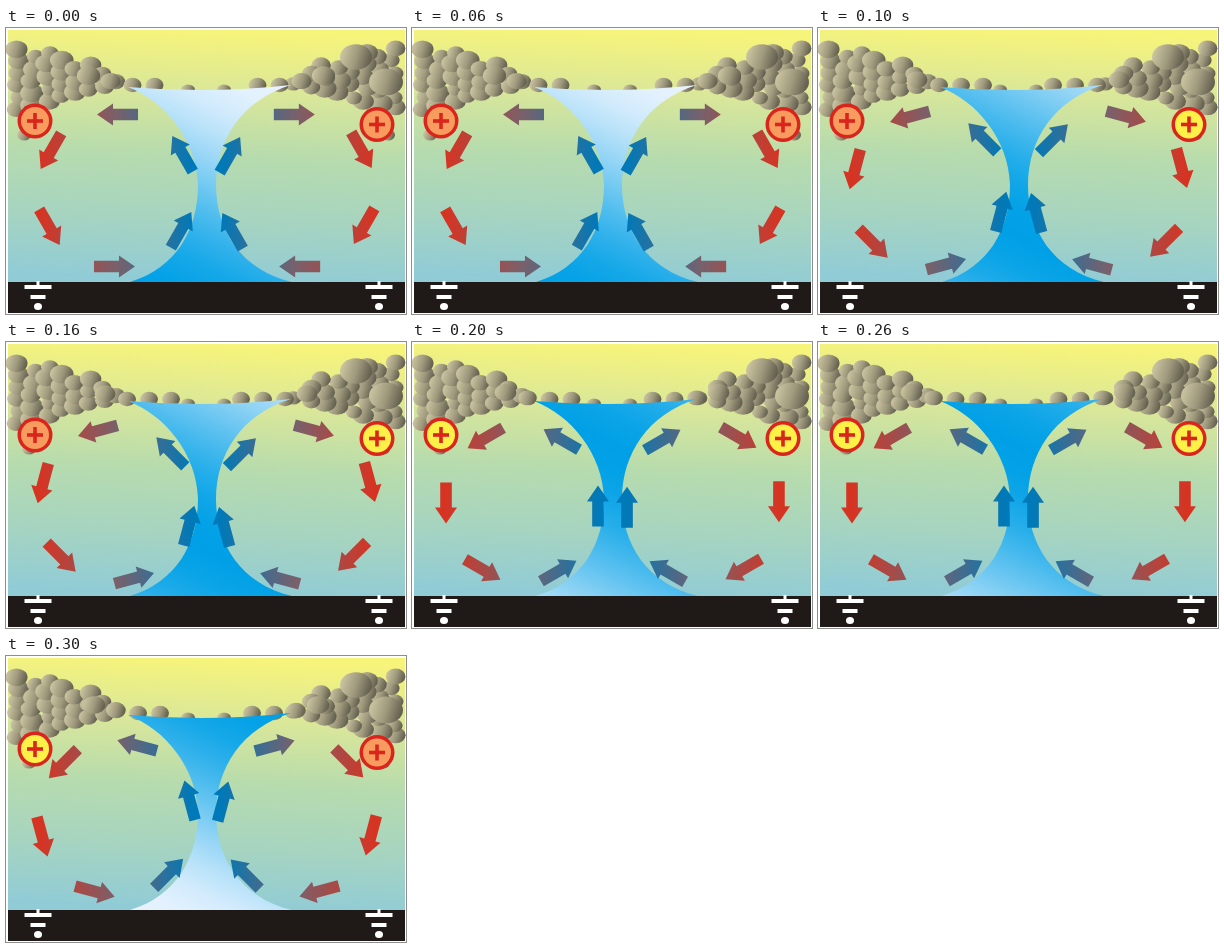
Animation of 400 by 286 pixels, one loop 0.4 s. Source, as an HTML page with a canvas:

```html
<!DOCTYPE html>
<html lang="en">
<head>
<meta charset="utf-8">
<title>Convection cells</title>
<style>
  html, body { margin: 0; width: 100%; height: 100%; overflow: hidden; background: #fff; }
  canvas { display: block; }
</style>
</head>
<body>
<canvas id="stage" width="400" height="286"></canvas>
<script>
const ctx = document.getElementById('stage').getContext('2d');
const STEP_MS = 100, STEPS = 4;
const LEFT = 1, RIGHT = -1;
const RED = '#da251d', WHITE = '#fff', BLACK = '#1f1a17';
const FLUID_BLUE = [0, 160, 230], FLUID_PALE = [232, 243, 254];

function linear(x0, y0, x1, y1, colors) {
  const g = ctx.createLinearGradient(x0, y0, x1, y1);
  colors.forEach((c, i) => g.addColorStop(i / (colors.length - 1), c));
  return g;
}

function disc(x, y, rx, ry, fill) {
  ctx.beginPath();
  ctx.ellipse(x, y, rx, ry, 0, 0, 2 * Math.PI);
  ctx.fillStyle = fill;
  ctx.fill();
}

function bar(cx, cy, w, h, fill) {
  ctx.fillStyle = fill;
  ctx.fillRect(cx - w / 2, cy - h / 2, w, h);
}

function background() {
  ctx.fillStyle = WHITE;
  ctx.fillRect(0, 0, 400, 286);
  ctx.fillStyle = linear(205, 2, 195, 254, ['#f7f47a', '#d9e799', '#b6dbae', '#a6d4c0', '#90cbd6']);
  ctx.fillRect(2, 2, 397, 252);
}

// Rocks are placed by their distance from the side wall.
function rock(side, distance, y, r) {
  const x = side === LEFT ? distance : 400 - distance;
  disc(x, y, r, r * .8,
    linear(x - r, y - r * .3, x + r, y + r * .3, ['#cec8a4', '#a09a7e', '#5c5849']));
}

// Each pile is a wedge, high at the wall and thin towards the middle.
function makePile(side, seed) {
  const random = () => (seed = (seed * 16807) % 2147483647) / 2147483647;
  const rocks = [];
  for (let d = 13; d < 122; d += 14) {
    const top = 14 + 38 * (d / 120) ** 1.5;
    let y = 54 + 30 * Math.max(0, 1 - d / 115) ** 1.1;
    do {
      const jitter = () => (random() - .5) * 6;
      rocks.push([side, d + jitter(), y + jitter() / 2, 8 + 4 * random()]);
      y -= 12;
    } while (y > top);
  }
  return rocks;
}
const piles = [...makePile(LEFT, 4127), ...makePile(RIGHT, 9413),
  [RIGHT, 50, 29, 16], [RIGHT, 20, 54, 17]];

function rocks(step) {
  const phase = (step + 3) % STEPS;
  for (const side of [LEFT, RIGHT]) {
    rock(side, 23 - 5 * Math.cos(step * Math.PI / 2), 107, 7);
  }
  piles.forEach(r => rock(...r));
  // Surface rocks drift outwards and climb on to the piles.
  for (const side of [LEFT, RIGHT]) {
    for (let i = 0; i < 4; i++) {
      const d = 165 - 5.5 * phase - 22 * i;
      const climb = Math.max(0, 120 - d);
      rock(side, d, 57 - climb * .25, 9 + climb * .07);
    }
  }
  rock(LEFT, 182, 62, 7);
  rock(RIGHT, 182, 62, 7);
}

// A blue wave rises through the fluid, slanted from lower left to upper right.
function fluidGradient(step) {
  const colors = [];
  for (let h = 0; h <= 1.001; h += .1) {
    const pale = (1 - Math.cos(Math.PI * (h - step / 3))) / 2;
    colors.push(`rgb(${FLUID_BLUE.map((c, k) => Math.round(c + (FLUID_PALE[k] - c) * pale))})`);
  }
  return linear(150, 270, 255, 45, colors);
}

function column(step) {
  ctx.beginPath();
  ctx.moveTo(122, 59);
  ctx.bezierCurveTo(159, 73, 191, 112, 192, 157);
  ctx.bezierCurveTo(192, 202, 170, 240, 124, 254);
  ctx.lineTo(286, 254);
  ctx.bezierCurveTo(235, 242, 210, 202, 210, 157);
  ctx.bezierCurveTo(210, 112, 236, 72, 285, 57);
  ctx.quadraticCurveTo(205, 66, 122, 59);
  ctx.fillStyle = fluidGradient(step);
  ctx.fill();
}

function arrowPath(x, y, angle) {
  ctx.save();
  ctx.translate(x, y);
  ctx.rotate(angle);
  ctx.moveTo(20.5, 0);
  ctx.lineTo(4.5, 11);
  ctx.lineTo(4.5, 5.8);
  ctx.lineTo(-20.5, 5.8);
  ctx.lineTo(-20.5, -5.8);
  ctx.lineTo(4.5, -5.8);
  ctx.lineTo(4.5, -11);
  ctx.closePath();
  ctx.restore();
}

// Six arrows circle round, red by the wall and blue by the fluid.
function cell(cx, side, tilt, step) {
  ctx.save();
  ctx.translate(cx, 162.5);
  ctx.scale(side, 1);
  ctx.beginPath();
  for (let i = 0; i < 6; i++) {
    const turn = (i + step / STEPS) * Math.PI / 3;
    arrowPath(-76 * Math.sin(turn - tilt), -76 * Math.cos(turn - tilt), Math.PI - turn);
  }
  ctx.fillStyle = linear(-76, 0, 76, 0, ['#d63423', '#7a606a', '#0079b8']);
  ctx.fill();
  ctx.restore();
}

function charge(x, y, bright) {
  disc(x, y, 17.5, 17.5, RED);
  disc(x, y, 14, 14, bright ? '#fdf047' : '#f79c5e');
  bar(x, y, 16, 3.6, RED);
  bar(x, y, 3.6, 16, RED);
}

function earth(x) {
  bar(x, 256, 3, 6, WHITE);
  bar(x, 259, 27, 4, WHITE);
  bar(x, 269, 15, 4, WHITE);
  disc(x, 278.5, 4, 3.5, WHITE);
}

function draw(step) {
  background();
  rocks(step);
  column(step);
  cell(110, LEFT, .02, step);
  cell(291, RIGHT, .035, step);
  charge(29, 93, step >= 2);
  charge(371, 96.5, step === 1 || step === 2);
  ctx.fillStyle = BLACK;
  ctx.fillRect(2, 254, 397, 31);
  earth(32);
  earth(373);
}

function tick() {
  draw(Math.floor(performance.now() / STEP_MS) % STEPS);
  requestAnimationFrame(tick);
}
tick();
</script>
</body>
</html>
```
